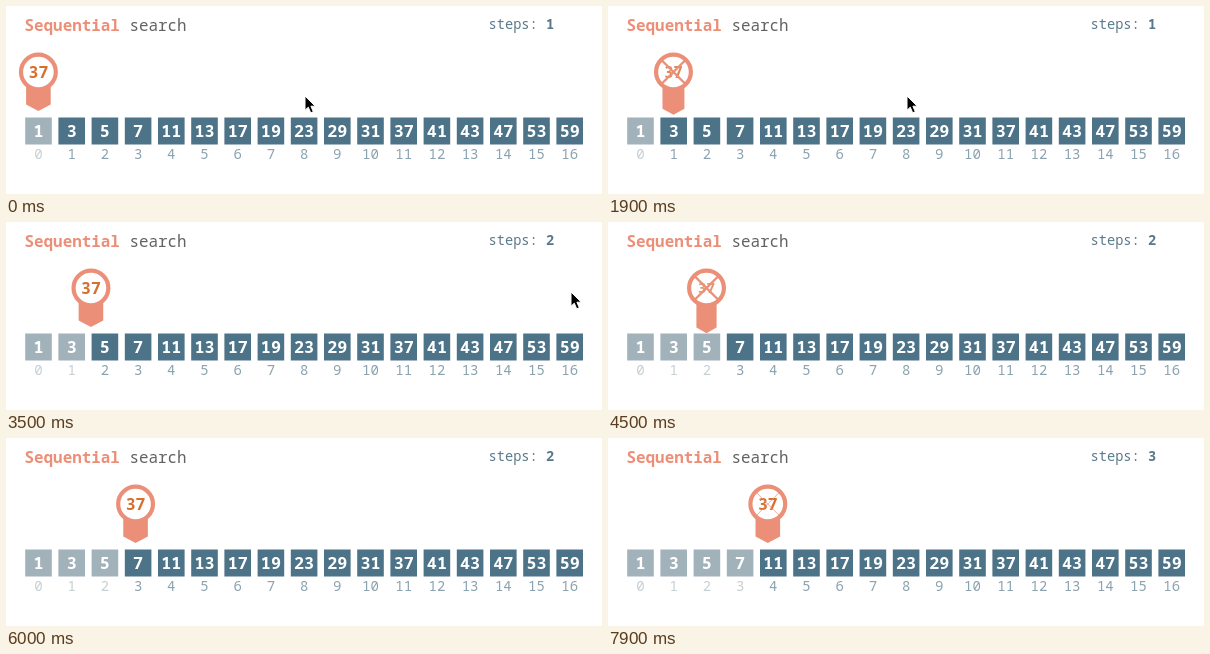
Write an HTML page that moves like this. It is 596 by 188 pixels and loops after 8000 ms.

```html
<!DOCTYPE html>
<html lang="en">
<head>
<meta charset="utf-8">
<title>Sequential search</title>
<style>
html, body { margin: 0; width: 100%; height: 100%; overflow: hidden; background: #fff; }
svg { display: block; width: 596px; height: 188px; }
text { font-family: "Noto Sans Mono", "DejaVu Sans Mono", monospace; white-space: pre; }
.title { font-size: 15.9px; fill: #626262; }
.title tspan { font-weight: 700; fill: #ec8f78; }
.steps { font-size: 13.7px; fill: #59798a; }
.steps tspan { font-weight: 700; }
.cell text { text-anchor: middle; }
.cell rect { fill: #4c7387; }
.cell .value { font-size: 16.8px; font-weight: 600; fill: #fff; }
.cell .index { font-size: 14px; fill: #89a2ae; }
.cell.seen rect { fill: #a2b2bb; }
.cell.seen .index { fill: #c6cfd3; }
#tail { fill: #ec8f78; }
#ring { fill: #fff; stroke: #ec8f78; stroke-width: 4.2; }
#goal { font-size: 16.5px; font-weight: 700; fill: #d5702f; text-anchor: middle; }
#cross { stroke: #ec8f78; fill: none; }
#cursor { fill: #000; stroke: #fff; stroke-width: 1; }
</style>
</head>
<body>
<svg viewBox="0 0 596 188">
  <text class="title" x="18.5" y="24.5"><tspan>Sequential</tspan> search</text>
  <text class="steps" x="482.5" y="22.5">steps: <tspan id="count">1</tspan></text>
  <g id="cells"></g>
  <g id="pin">
    <path id="tail"/>
    <circle id="ring" cy="66" r="17.4"/>
    <g id="goalBox"><text id="goal" y="6">37</text></g>
    <path id="cross" d="M-11.5 54.5L11.5 77.5M11.5 54.5L-11.5 77.5"/>
  </g>
  <path id="cursor" d="M0 0V14.2L3.3 11.2L5.7 16.8L8.3 15.7L5.9 10.2H10.3Z"/>
</svg>
<script>
const LOOP = 8000, TICK = 100;
const PRIMES = [1, 3, 5, 7, 11, 13, 17, 19, 23, 29, 31, 37, 41, 43, 47, 53, 59];
const GLIDE = [.04, .25, .59, .855, .94, .985, 1];
// start time and first step of the glide
const MOVES = [[800, 0], [3400, 1], [5600, 0], [7700, 1]];
// start time, time the last trace of the cross goes, cell
const CHECKS = [[1900, 3000, 1], [4400, 4900, 2], [6700, LOOP, 3]];
const POKE = [.6, 1, .6, .2, 0];
const COUNT_AT = [2100, 6900];
const CURSOR = [[0, 299, 90], [3400, 480, 76], [3500, 565, 70], [3600, 582, 81], [3700, 640, 90]];

const $ = id => document.getElementById(id);
const cells = PRIMES.map((value, i) => {
  const g = document.createElementNS("http://www.w3.org/2000/svg", "g");
  const x = 19.2 + 33.2 * i, mid = x + 13.3;
  g.innerHTML = `<rect x="${x}" y="111.5" width="26.6" height="27"/>
    <text class="value" x="${mid}" y="130.7">${value}</text>
    <text class="index" x="${mid}" y="153">${i}</text>`;
  $("cells").append(g);
  return g;
});

function pinX(t) {
  let place = 0;
  for (const [start, first] of MOVES) {
    if (t >= start) place += GLIDE[Math.min(first + (t - start) / TICK, GLIDE.length - 1)];
  }
  return 32.4 + 33.05 * place;
}

function drawPin(t) {
  const check = CHECKS.find(([start, end]) => t >= start && t < end);
  const step = check ? (t - check[0]) / TICK : -1;
  const poke = POKE[step] || 0;
  const strike = Math.min(1, poke / .6);
  const half = 12.3 - 2.2 * poke, shoulder = 98.5 + 7 * poke, tip = 105 + 6.3 * poke;
  $("pin").setAttribute("transform", `translate(${pinX(t)} 0)`);
  $("tail").setAttribute("d",
    `M${-half} 79H${half}V${shoulder}L0 ${tip}L${-half} ${shoulder}Z`);
  $("goalBox").setAttribute("transform", `translate(0 66) scale(${1 - .12 * poke})`);
  $("goalBox").setAttribute("opacity", 1 - .3 * poke);
  $("cross").setAttribute("opacity", check ? .75 + .25 * strike : 0);
  $("cross").setAttribute("stroke-width", 1 + 1.4 * strike);
}

function draw(t) {
  drawPin(t);
  cells.forEach((cell, i) => {
    const check = CHECKS.find(c => c[2] === i);
    const seen = i === 0 || check && t >= check[0] + TICK;
    cell.setAttribute("class", seen ? "cell seen" : "cell");
  });
  $("count").textContent = 1 + COUNT_AT.filter(at => t >= at).length;
  const [, x, y] = CURSOR.filter(c => t >= c[0]).pop();
  $("cursor").setAttribute("transform", `translate(${x} ${y})`);
}

const begin = performance.now();
function run(now) {
  const t = Math.max(0, now - begin) % LOOP;
  draw(Math.floor(t / TICK) * TICK);
  requestAnimationFrame(run);
}
draw(0);
requestAnimationFrame(run);
</script>
</body>
</html>
```
